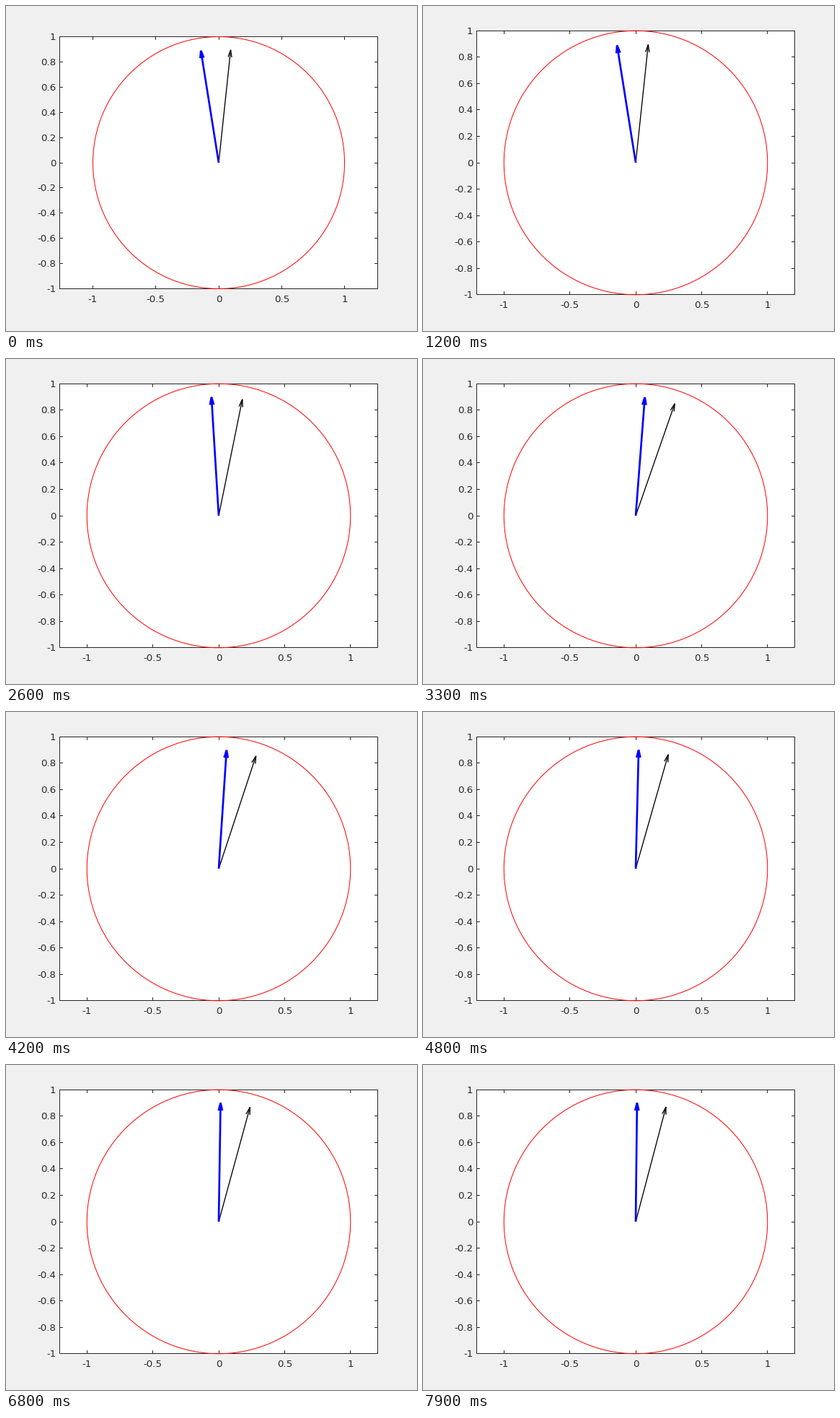
Write a matplotlib script that moves like this. It is 570 px wide and 450 px high and loops after 8 s.

```python
import numpy as np
import matplotlib.pyplot as plt
from matplotlib.animation import FuncAnimation

W, H, DPI = 570, 450, 100
STEP_MS, FRAMES = 100, 80
PX = 72 / DPI
INK = "#262626"
CX, CY = 295, 217
LEFT, RIGHT = 74.5, 515.5
RADIUS_FIRST, RADIUS_REST = 174.5, 182.75
TICK = 4.4

# time in ms, black angle, blue angle (degrees clockwise from up)
KEYS = np.array([
    (1100, 6.06, -9.06), (1200, 6.06, -9.05), (2000, 6.15, -8.95),
    (2600, 11.5, -3.5), (2900, 15.1, 0.1), (3450, 19.8, 5.0),
    (3800, 19.4, 4.7), (4200, 18.3, 3.8), (4700, 16.2, 1.7),
    (5400, 14.8, 0.2), (5650, 14.7, 0.15), (6500, 15.2, 0.8),
    (6800, 15.3, 0.9), (7400, 15.1, 0.85), (7900, 14.8, 0.65),
])


def slopes(t, v):
    """Shape-preserving tangents: harmonic mean, zero at turning points."""
    d = np.diff(v) / np.diff(t)
    m = np.zeros_like(v)
    for i in range(1, len(v) - 1):
        a, b = d[i - 1], d[i]
        if a * b > 0:
            m[i] = 2 * a * b / (a + b)
    m[-1] = d[-1]
    return m


def smooth(x, t, v):
    m = slopes(t, v)
    x = np.clip(x, t[0], t[-1])
    i = np.clip(np.searchsorted(t, x, side="right") - 1, 0, len(t) - 2)
    h = t[i + 1] - t[i]
    s = (x - t[i]) / h
    return ((1 + 2 * s) * (1 - s) ** 2 * v[i] + s * (1 - s) ** 2 * h * m[i]
            + s * s * (3 - 2 * s) * v[i + 1] + s * s * (s - 1) * h * m[i + 1])


TIMES = np.arange(FRAMES) * STEP_MS
BLACK = smooth(TIMES, KEYS[:, 0], KEYS[:, 1])
BLUE = smooth(TIMES, KEYS[:, 0], KEYS[:, 2])

fig = plt.figure(figsize=(W / DPI, H / DPI), dpi=DPI, facecolor="#f0f0f0")
ax = fig.add_axes([0, 0, 1, 1])
ax.set_xlim(0, W)
ax.set_ylim(H, 0)
ax.axis("off")


def pixel(v):
    return np.floor(v) + 0.5


def stroke(x, y, color, width, z, **kw):
    return ax.plot(x, y, color=color, lw=width * PX, zorder=z, snap=False,
                   solid_capstyle="butt", **kw)[0]


def label(x, y, value, ha):
    return ax.text(x, y + 4.9, f"{value:g}", color=INK, ha=ha, va="baseline",
                   family="DejaVu Sans", size=13.33 * PX, zorder=3)


def build_plot(r):
    """Box, ticks, labels and unit circle for a radius in pixels."""
    top, bottom = pixel(CY - r), pixel(CY + r)
    parts = [ax.add_patch(plt.Rectangle((LEFT, top), RIGHT - LEFT, bottom - top,
                                        fc="white", ec="none", zorder=0))]
    parts.append(stroke([LEFT, RIGHT, RIGHT, LEFT, LEFT],
                        [top, top, bottom, bottom, top], INK, 1, 2,
                        solid_joinstyle="miter"))
    for k in range(-5, 6):
        y = pixel(CY - r * k / 5)
        for x, d in ((LEFT, TICK), (RIGHT, -TICK)):
            parts.append(stroke([x, x + d], [y, y], INK, 1, 2))
        parts.append(label(69.3, y, k / 5, "right"))
    for k in range(-2, 3):
        x = pixel(CX + r * k / 2)
        for y, d in ((top, TICK), (bottom, -TICK)):
            parts.append(stroke([x, x], [y, y + d], INK, 1, 2))
        parts.append(label(x, bottom + 14, k / 2, "center"))
    a = np.linspace(0, 2 * np.pi, 361)
    parts.append(stroke(CX + r * np.cos(a), CY + r * np.sin(a), "red", 1, 4))
    return parts


def build_arrow(color, width, z):
    shaft = stroke([], [], color, width, z)
    head = stroke([], [], color, width, z, solid_joinstyle="bevel")
    return shaft, head


def aim(arrow, degrees, r):
    a = np.radians(degrees)
    along = np.array([np.sin(a), -np.cos(a)])
    across = np.array([np.cos(a), np.sin(a)])
    base = np.array([CX, CY])
    length = 0.9 * r
    tip = base + length * along
    back = tip - 0.064 * length * along
    side = 0.016 * length * across
    arrow[0].set_data(*np.array([base, tip]).T)
    arrow[1].set_data(*np.array([back - side, tip, back + side]).T)


first = build_plot(RADIUS_FIRST)
rest = build_plot(RADIUS_REST)
black = build_arrow("black", 1.33, 5)
blue = build_arrow("blue", 2.67, 6)


def update(n):
    for part in first:
        part.set_visible(n == 0)
    for part in rest:
        part.set_visible(n > 0)
    r = RADIUS_REST if n else RADIUS_FIRST
    aim(black, BLACK[n], r)
    aim(blue, BLUE[n], r)
    return [*black, *blue]


anim = FuncAnimation(fig, update, frames=FRAMES, interval=STEP_MS,
                     repeat=True, repeat_delay=0)
plt.show()
```
